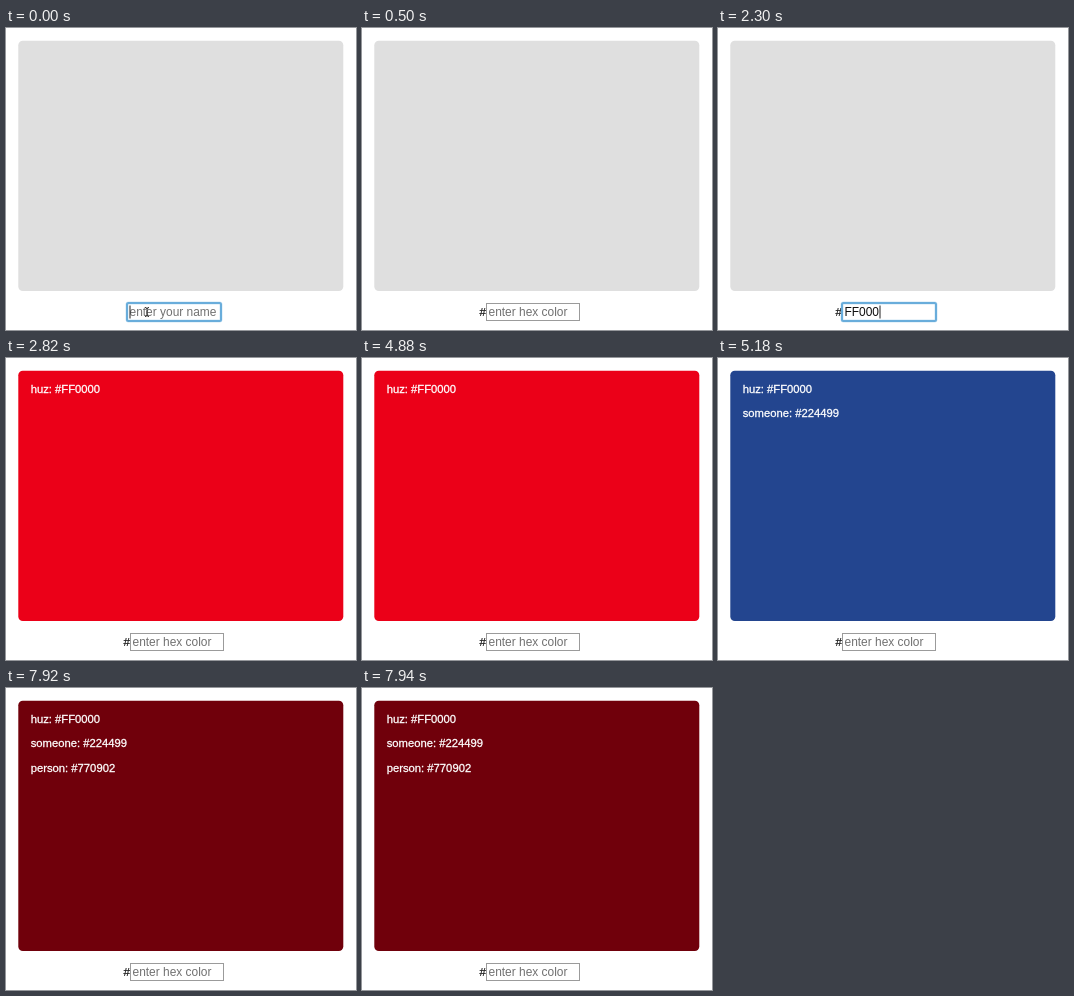
Recreate the animation shown at these times as an HTML page with a canvas. Size 350 px wide and 302 px high, loop 8000 ms.

```html
<!DOCTYPE html>
<html lang="en">
<head>
<meta charset="utf-8">
<title>Shared color room</title>
<style>
html, body { margin: 0; width: 100%; height: 100%; overflow: hidden; background: #fff; }
canvas { display: block; width: 350px; height: 302px; }
</style>
</head>
<body>
<canvas id="stage"></canvas>
<script>
const W = 350, H = 302, LOOP = 8000;
const canvas = document.getElementById('stage');
const ctx = canvas.getContext('2d');
const scale = window.devicePixelRatio || 1;
canvas.width = W * scale;
canvas.height = H * scale;

const FACE = '"Liberation Sans", Arial, sans-serif';
const GREY = [223, 223, 223], RED = [235, 0, 24], BLUE = [35, 69, 143], WINE = [112, 0, 11];

const NAME = 'huz', HEX = 'FF0000';
const NAME_START = 320, NAME_STEP = 60, NAME_SENT = 500;
const HEX_FOCUS = 1700, HEX_START = 1920, HEX_STEP = 90, HEX_SENT = 2480, HEX_BLUR = 2800;

const messages = [
  { at: HEX_SENT, text: NAME + ': #' + HEX, color: RED, fade: 220 },
  { at: 5180, text: 'someone: #224499', color: BLUE, fade: 0 },
  { at: 7920, text: 'person: #770902', color: WINE, fade: 0 }
];

// Pointer keys: time, x, y
const leaving = [[0, 141, 284], [20, 141, 284], [130, 70, 205], [260, 4, 86], [290, -14, 70]];
const entering = [[1220, 6, 168], [1380, 82, 246], [1540, 161, 290], [1680, 163, 285], [1920, 163, 285]];

const mix = (a, b, p) => a + (b - a) * p;

function label(text, x, y, size, color, weight = 0) {
  ctx.font = `${size}px ${FACE}`;
  ctx.fillStyle = color;
  ctx.fillText(text, x, y);
  if (weight) {
    ctx.strokeStyle = color;
    ctx.lineWidth = weight;
    ctx.strokeText(text, x, y);
  }
}

function roundRect(x, y, w, h, r) {
  ctx.beginPath();
  ctx.roundRect(x, y, w, h, r);
}

function typed(word, t, start, step) {
  const count = Math.floor((t - start) / step) + 1;
  return word.slice(0, Math.max(0, Math.min(word.length, count)));
}

function drawPanel(t) {
  let color = GREY;
  for (const m of messages) {
    if (t < m.at) continue;
    const p = m.fade ? Math.min(1, (t - m.at) / m.fade) : 1;
    color = color.map((c, i) => Math.round(mix(c, m.color[i], p)));
  }
  ctx.fillStyle = `rgb(${color})`;
  roundRect(12.3, 12.8, 325, 250.2, 4.5);
  ctx.fill();
  messages.forEach((m, i) => {
    if (t >= m.at) label(m.text, 24.7, 34.8 + i * 24.4, 11.25, '#fff', 0.3);
  });
}

function drawField(x, value, placeholder, focused) {
  const y = 275, w = 94, h = 18;
  ctx.fillStyle = '#fff';
  ctx.fillRect(x, y, w, h);
  if (focused) {
    ctx.strokeStyle = 'rgba(105,174,222,.3)';
    ctx.lineWidth = 3;
    roundRect(x, y, w, h, 1.5);
    ctx.stroke();
    ctx.strokeStyle = '#69addb';
    ctx.lineWidth = 2;
    ctx.stroke();
  } else {
    ctx.strokeStyle = '#9b9b9b';
    ctx.lineWidth = 1;
    ctx.strokeRect(x + .5, y + .5, w - 1, h - 1);
  }
  label(value || placeholder, x + 2.5, 288.2, 11.95, value ? '#111' : '#717171');
  if (focused) {
    const caret = x + 2.5 + (value ? ctx.measureText(value).width + .5 : 0);
    ctx.fillStyle = '#222';
    ctx.fillRect(caret, 277.5, 1, 13);
  }
}

function pointerAt(t) {
  for (const path of [leaving, entering]) {
    for (let i = 1; i < path.length; i++) {
      const [t0, x0, y0] = path[i - 1], [t1, x1, y1] = path[i];
      if (t >= t0 && t < t1) {
        const p = (t - t0) / (t1 - t0);
        return [mix(x0, x1, p), mix(y0, y1, p)];
      }
    }
  }
  return null;
}

function drawBeam(x, y) {
  ctx.strokeStyle = '#222';
  ctx.lineWidth = 1;
  ctx.beginPath();
  ctx.moveTo(x - 2, y - 4.5);
  ctx.quadraticCurveTo(x, y - 4.5, x, y - 3);
  ctx.quadraticCurveTo(x, y - 4.5, x + 2, y - 4.5);
  ctx.moveTo(x, y - 3);
  ctx.lineTo(x, y + 3);
  ctx.moveTo(x - 2, y + 4.5);
  ctx.quadraticCurveTo(x, y + 4.5, x, y + 3);
  ctx.quadraticCurveTo(x, y + 4.5, x + 2, y + 4.5);
  ctx.stroke();
}

function drawArrow(x, y) {
  ctx.beginPath();
  ctx.moveTo(x, y);
  [[0, 11], [2.5, 8.7], [4.3, 12.5], [6, 11.7], [4.3, 8], [7.7, 8]]
    .forEach(([dx, dy]) => ctx.lineTo(x + dx, y + dy));
  ctx.closePath();
  ctx.fillStyle = '#111';
  ctx.fill();
  ctx.strokeStyle = '#fff';
  ctx.lineWidth = .8;
  ctx.stroke();
}

function drawPointer(t) {
  const spot = pointerAt(t);
  if (!spot) return;
  const [x, y] = spot;
  const inField = x > 121 && x < 218 && y > 275 && y < 293;
  (inField ? drawBeam : drawArrow)(x, y);
}

function render(t) {
  ctx.setTransform(scale, 0, 0, scale, 0, 0);
  ctx.fillStyle = '#fff';
  ctx.fillRect(0, 0, W, H);
  drawPanel(t);
  if (t < NAME_SENT) {
    drawField(121, typed(NAME, t, NAME_START, NAME_STEP), 'enter your name', true);
  } else {
    const value = t < HEX_SENT ? typed(HEX, t, HEX_START, HEX_STEP) : '';
    label('#', 117.6, 288.2, 11.5, '#111', 0.2);
    drawField(124, value, 'enter hex color', t >= HEX_FOCUS && t < HEX_BLUR);
  }
  drawPointer(t);
}

const begin = performance.now();
function tick() {
  render((performance.now() - begin) % LOOP);
  requestAnimationFrame(tick);
}
tick();
</script>
</body>
</html>
```
